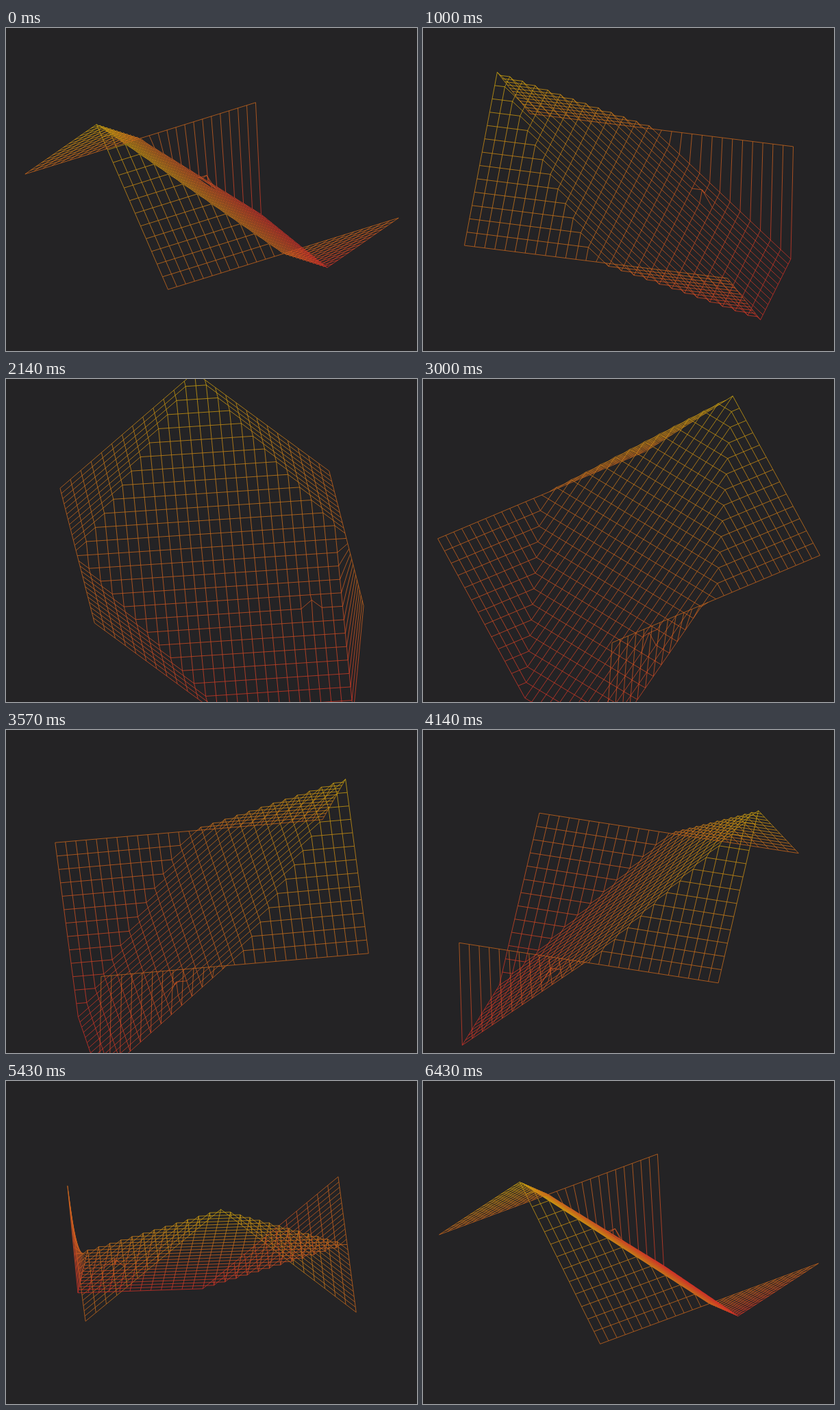
An HTML page with a canvas for the animation above (6570 ms loop, 600 by 471 pixels).

```html
<!DOCTYPE html>
<html lang="en">
<head>
<meta charset="utf-8">
<title>Rotating wireframe surface</title>
<style>
  html, body { margin: 0; width: 100%; height: 100%; overflow: hidden; background: #242325; }
  canvas { display: block; width: 600px; height: 471px; }
</style>
</head>
<body>
<canvas id="stage" width="600" height="471"></canvas>
<script>
const ctx = document.getElementById('stage').getContext('2d');

const LOOP = 6570, STEPS = 46;
const N = 13;                          // cells from the centre to each edge
const CX = 300.5, CY = 245;
const RX = 198, RY = 99, RISE = 156.6; // orthographic view, 30 degrees above the plane

// [step, angle in degrees]
const TURN = [[0, -31.8], [7, 14], [8, 24], [15, 82.7], [21, 140],
              [24, 163.5], [29, 197.2], [32, 219], [38, 266.2], [45, 323.6]];

const LOW = [212, 50, 40], MID = [205, 104, 28], HIGH = [208, 168, 14];

// Roof-like surface with one open quarter and a single raised vertex.
function height(u, v) {
  const roof = Math.min(Math.abs(u), N - Math.abs(v));
  if (u <= 0) return roof / N;
  const open = v > 0 && v < N && !(u === 5 && v === 9);
  return -(open ? u : roof) / N;
}

function colour(z) {
  const end = z > 0 ? HIGH : LOW;
  return `rgb(${MID.map((m, i) => Math.round(m + (end[i] - m) * Math.abs(z)))})`;
}

const points = [];
const lines = [];
const index = (u, v) => (u + N) * (2 * N + 1) + v + N;

for (let u = -N; u <= N; u++) {
  for (let v = -N; v <= N; v++) {
    const z = height(u, v);
    points.push({ u: u / N, v: v / N, z, ink: colour(z) });
    if (u < N) lines.push([index(u, v), index(u + 1, v)]);
    if (v < N) lines.push([index(u, v), index(u, v + 1)]);
  }
}

function angleAt(step) {
  let i = 0;
  while (i < TURN.length - 2 && step > TURN[i + 1][0]) i++;
  const [s0, a0] = TURN[i], [s1, a1] = TURN[i + 1];
  return (a0 + (a1 - a0) * (step - s0) / (s1 - s0)) * Math.PI / 180;
}

function inkBetween(a, b, from, to) {
  if (a.ink === b.ink) return a.ink;
  const ink = ctx.createLinearGradient(...from, ...to);
  ink.addColorStop(0, a.ink);
  ink.addColorStop(1, b.ink);
  return ink;
}

function draw(step) {
  const angle = angleAt(step), c = Math.cos(angle), s = Math.sin(angle);
  const flat = points.map(({ u, v, z }) => [
    CX + RX * (u * c + v * s),
    CY + RY * (u * s - v * c) - RISE * z
  ]);
  ctx.globalAlpha = 1;
  ctx.fillStyle = '#242325';
  ctx.fillRect(0, 0, 600, 471);
  ctx.globalAlpha = 0.76;
  ctx.lineWidth = 1;
  for (const [a, b] of lines) {
    ctx.strokeStyle = inkBetween(points[a], points[b], flat[a], flat[b]);
    ctx.beginPath();
    ctx.moveTo(...flat[a]);
    ctx.lineTo(...flat[b]);
    ctx.stroke();
  }
}

// Seven steps a second, on a 10 ms clock.
const startOf = step => Math.round(step * 100 / 7) * 10;

function stepAt(time) {
  let step = Math.min(STEPS - 1, Math.floor(time * 7 / 1000) + 1);
  while (startOf(step) > time) step--;
  return step;
}

const t0 = performance.now();
let shown = -1;

function tick() {
  const step = stepAt((performance.now() - t0) % LOOP);
  if (step !== shown) draw(shown = step);
  requestAnimationFrame(tick);
}
tick();
</script>
</body>
</html>
```
